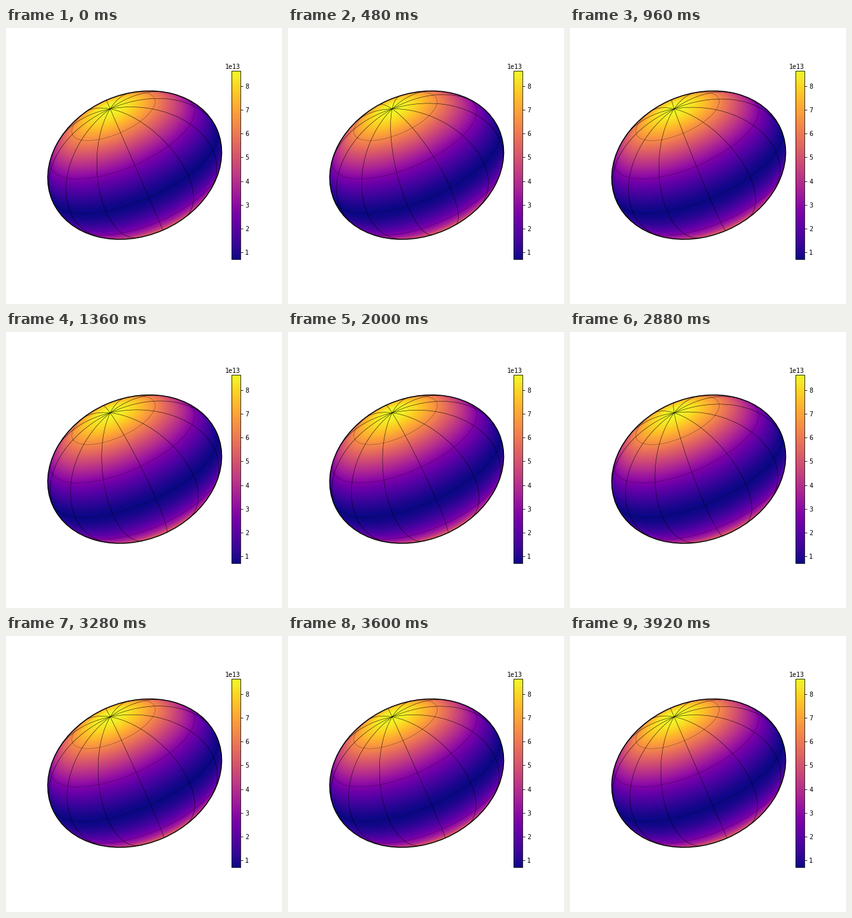
Write a matplotlib script that moves like this. It is 432 px wide and 432 px high and loops after 4000 ms.

```python
import numpy as np
import matplotlib.pyplot as plt
from matplotlib.animation import FuncAnimation
from matplotlib.cm import ScalarMappable
from matplotlib.colors import Normalize
from matplotlib.patches import Ellipse

SIZE, DPI = 432, 72
FRAMES, INTERVAL = 50, 80
INC, OBL = np.radians(60), np.radians(23.55)
SQUASH = 0.79            # projected minor / major axis
POLAR = 0.706            # polar radius, equator = 1
SPIN2 = 2 / POLAR - 2    # squared spin rate of the equilibrium shape
HOT = 2.85               # hc / (wavelength k T) at the pole
VMIN, VMAX = 0.70e13, 8.64e13
HALF = 1.05

plt.rcParams["font.family"] = "DejaVu Sans Mono"
plt.rcParams["font.size"] = 10


def turn(x, y):
    """Squash along the spin axis, then roll by the obliquity."""
    y = y * SQUASH
    return (x * np.cos(OBL) - y * np.sin(OBL),
            x * np.sin(OBL) + y * np.cos(OBL))


def project(lat, lon):
    """Sky position of points on the globe, NaN on the far side."""
    front = np.cos(lat) * np.cos(lon)
    x = np.cos(lat) * np.sin(lon)
    y = np.sin(lat) * np.sin(INC) - front * np.cos(INC)
    depth = np.sin(lat) * np.cos(INC) + front * np.sin(INC)
    x, y = turn(x, y)
    hidden = depth < 0
    return np.where(hidden, np.nan, x), np.where(hidden, np.nan, y)


def gravity(sin_lat):
    rho2 = 1 - sin_lat ** 2
    z2 = (POLAR * sin_lat) ** 2
    pull = (rho2 + z2) ** -1.5
    return np.sqrt(rho2 * (pull - SPIN2) ** 2 + z2 * pull ** 2)


def intensity(sin_lat):
    """Planck emission of a gravity-darkened surface."""
    temp = (gravity(sin_lat) * POLAR ** 2) ** 0.25
    return VMAX * np.expm1(HOT) / np.expm1(HOT / temp)


def star_image(res=590):
    step = 2 * HALF / res
    axis = -HALF + step * (np.arange(res) + 0.5)
    px, py = np.meshgrid(axis, axis)
    x = px * np.cos(OBL) + py * np.sin(OBL)
    y = (py * np.cos(OBL) - px * np.sin(OBL)) / SQUASH
    depth = np.sqrt(np.clip(1 - x ** 2 - y ** 2, 0, 1))
    return intensity(y * np.sin(INC) + depth * np.cos(INC))


def px_axes(left, top, width, height):
    return fig.add_axes([left / SIZE, 1 - (top + height) / SIZE,
                         width / SIZE, height / SIZE])


fig = plt.figure(figsize=(SIZE / DPI, SIZE / DPI), dpi=DPI, facecolor="white")
ax = px_axes(54, 67.2, 294.9, 294.9)
ax.set_axis_off()
norm = Normalize(VMIN, VMAX)

extent = (-HALF, HALF, -HALF, HALF)
disc = ax.imshow(star_image(), origin="lower", extent=extent,
                 cmap="plasma", norm=norm)
shape = dict(width=2, height=2 * SQUASH, angle=np.degrees(OBL))
disc.set_clip_path(Ellipse((0, 0), transform=ax.transData, **shape))
ax.add_patch(Ellipse((0, 0), fill=False, ec="black", lw=1.5, zorder=5, **shape))
ax.set(xlim=(-HALF, HALF), ylim=(-HALF, HALF))

around = np.linspace(-np.pi, np.pi, 1000)
for deg in range(-60, 61, 30):
    ax.plot(*project(np.radians(deg), around), "k-", lw=0.5, alpha=0.5)

arc = np.linspace(-np.pi / 2, np.pi / 2, 500)
meridians = [ax.plot([], [], "k-", lw=0.5)[0] for _ in range(12)]

cax = px_axes(352.5, 67.2, 14.75, 294.9)
fig.colorbar(ScalarMappable(norm, "plasma"), cax=cax)


def update(i):
    spin = 2 * np.pi * i / (FRAMES - 1)
    for k, line in enumerate(meridians):
        line.set_data(*project(arc, spin + k * np.pi / 6))
    return meridians


anim = FuncAnimation(fig, update, frames=FRAMES, interval=INTERVAL,
                     repeat=True, repeat_delay=0)
plt.show()
```
